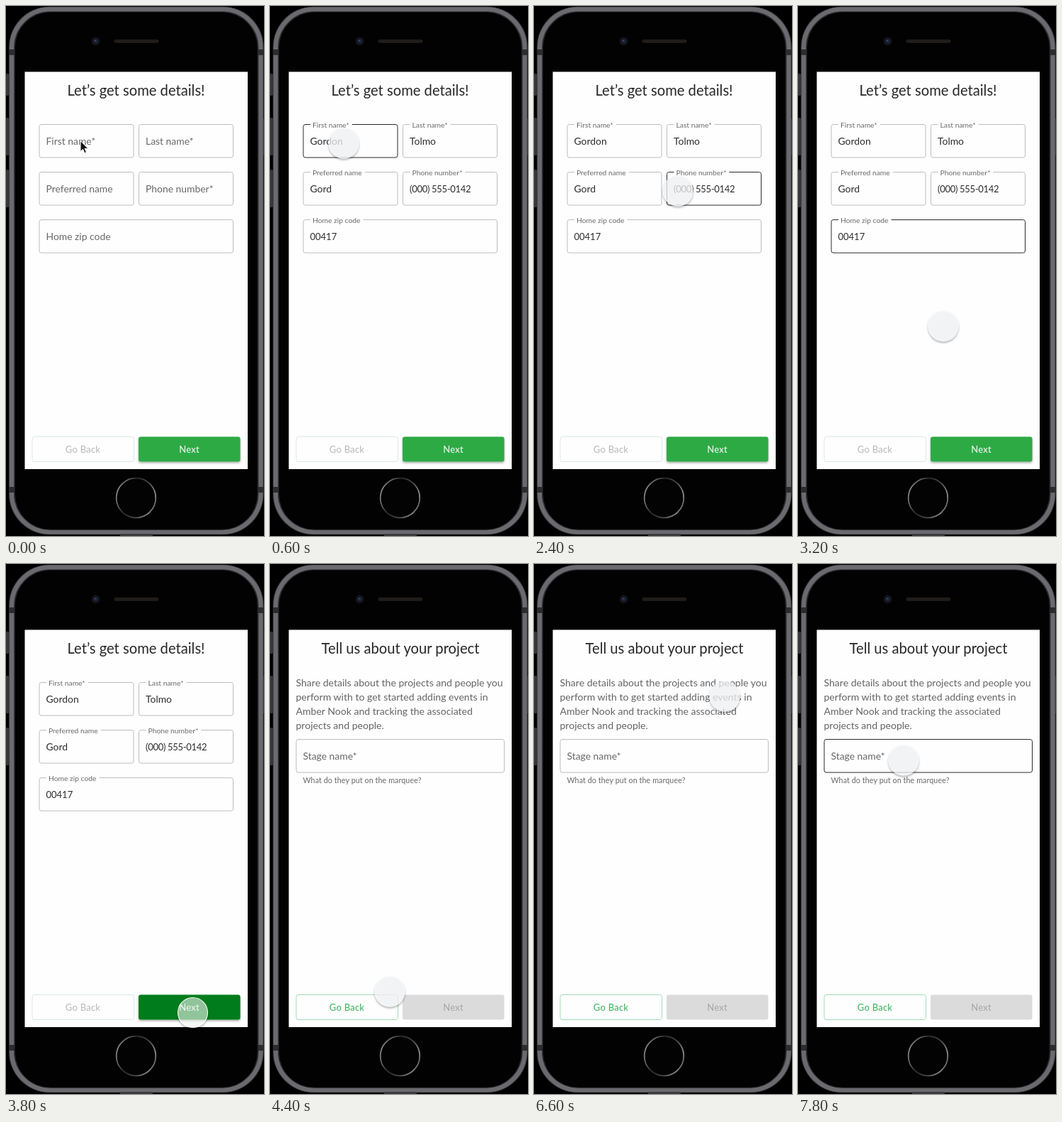
Write an HTML page that moves like this. It is 364 by 745 pixels and loops after 8000 ms.

```html
<!DOCTYPE html>
<html lang="en">
<head>
<meta charset="utf-8">
<title>Sign-up form</title>
<style>
  html, body { margin: 0; width: 100%; height: 100%; overflow: hidden; background: #000; }
  svg { display: block; width: 364px; height: 745px; font-family: Lato, "Open Sans", sans-serif; }
  text { font-size: 13.9px; fill: #67676a; }
  .title { font-size: 20.2px; fill: #262628; text-anchor: middle; }
  .para { font-size: 14.05px; fill: #646467; }
  .float { font-size: 10.3px; fill: #6a6a6c; }
  .help { font-size: 10.7px; letter-spacing: .1px; }
  .value { fill: #2c2c2e; }
  .num { font-size: 13px; }
  .phone { letter-spacing: -.3px; }
  .btn { font-size: 13px; letter-spacing: .25px; text-anchor: middle; }
  .box { fill: none; stroke: #bdbdbf; stroke-width: 1; }
  .focus .box { stroke: #2a2a2c; }
</style>
</head>
<body>
<svg viewBox="0 0 364 745">
  <defs>
    <linearGradient id="ring" x1="0" y1=".3" x2="1" y2=".7">
      <stop offset="0" stop-color="#8e8e90"/>
      <stop offset=".12" stop-color="#6a6a6c"/>
      <stop offset=".35" stop-color="#2a2a2c"/>
      <stop offset=".65" stop-color="#4a4a4c"/>
      <stop offset=".9" stop-color="#8e8e90"/>
      <stop offset="1" stop-color="#58585a"/>
    </linearGradient>
    <filter id="lift" x="-10%" y="-20%" width="120%" height="160%">
      <feDropShadow dx="0" dy="1.8" stdDeviation="1.5" flood-color="#000" flood-opacity=".32"/>
    </filter>
    <!-- shadow only outside the shape, so it does not show through -->
    <filter id="halo" x="-30%" y="-30%" width="160%" height="170%">
      <feGaussianBlur in="SourceAlpha" stdDeviation="1.5"/>
      <feOffset dy="1.8"/>
      <feComposite operator="out" in2="SourceAlpha"/>
    </filter>
  </defs>

  <g id="device">
    <rect width="364" height="745" fill="#000"/>
    <g fill="#37373a">
      <rect x="0" y="95" width="4" height="31" rx="1.5"/>
      <rect x="0" y="157" width="4" height="53" rx="1.5"/>
      <rect x="0" y="230" width="4" height="53" rx="1.5"/>
      <rect x="362" y="158" width="2" height="52"/>
    </g>
    <rect x="4" y="1" width="359.500" height="742" rx="57" fill="#3a3a3d"/>
    <rect x="8" y="4.500" width="351.500" height="735" rx="54" fill="none" stroke="#6a6a6f" stroke-width="6"/>
    <g fill="#2c2c2f">
      <rect x="4" y="61" width="8" height="8"/>
      <rect x="355.500" y="61" width="8" height="8"/>
      <rect x="4" y="676" width="8" height="8"/>
      <rect x="355.500" y="676" width="8" height="8"/>
    </g>
    <rect x="12.500" y="8.500" width="342.500" height="727.500" rx="50" fill="#020203" stroke="#1d1d20"/>
    <rect x="161" y="742" width="46" height="3" rx="1" fill="#3b3b3e"/>
    <circle cx="126.500" cy="49.500" r="6" fill="#14151a"/>
    <circle cx="126.500" cy="49.500" r="2.800" fill="#1d2742"/>
    <circle cx="125.800" cy="48.800" r="1" fill="#3d5186"/>
    <rect x="152.500" y="47" width="63" height="5" rx="2.500" fill="#1f1c1a"/>
    <circle cx="183.500" cy="691.500" r="27.800" fill="#030304" stroke="url(#ring)" stroke-width="1.800"/>
    <rect x="26.500" y="92.500" width="314.500" height="558.500" fill="#fdfefd"/>
  </g>

  <g id="details">
    <text class="title" x="183.500" y="126">Let’s get some details!</text>
  </g>

  <g id="project">
    <text class="title" x="184" y="126">Tell us about your project</text>
    <text class="help" x="46.500" y="307.500">What do they put on the marquee?</text>
  </g>

  <g id="buttons">
    <rect id="backBox" x="37" y="605.500" width="143.500" height="35" rx="3" fill="#fdfefd"/>
    <text id="backText" class="btn" x="108.500" y="627.500">Go Back</text>
    <rect id="nextBox" x="187" y="605.500" width="143.500" height="35" rx="3"/>
    <text id="nextText" class="btn" x="258.500" y="627.500">Next</text>
  </g>

  <path id="arrow" d="M105 189.500v15l3.500-3.200 2.400 5.400 2.500-1.100-2.300-5.200h4.800z"
        fill="#111" stroke="#fff" stroke-width="1"/>
  <g id="touch">
    <circle r="21.500" filter="url(#halo)" opacity=".3"/>
    <circle id="dot" r="21" stroke-width="1.200"/>
  </g>
</svg>

<script>
const LOOP = 8000, STEP = 200;
const FILL = 400, PRESS = 3600, TURN = 4000;
const PAPER = '#fdfefd';
const $ = id => document.getElementById(id);

function paint(el, attrs) {
  for (const key in attrs) el.setAttribute(key, attrs[key]);
}

function add(parent, tag, attrs, text) {
  const el = document.createElementNS('http://www.w3.org/2000/svg', tag);
  paint(el, attrs);
  if (text) el.textContent = text;
  return parent.appendChild(el);
}

const show = (el, on) => el.setAttribute('visibility', on ? 'inherit' : 'hidden');

// focus: [start, end] in ms
function field(page, x, y, w, label, value, focus, kind = '') {
  const g = add($(page), 'g', {});
  add(g, 'rect', { class: 'box', x, y, width: w, height: 46.5, rx: 3 });
  const gap = add(g, 'rect', { x: x + 10, y: y - 2, height: 4, fill: PAPER });
  const small = add(g, 'text', { class: 'float', x: x + 13, y: y + 4 }, label);
  gap.setAttribute('width', small.getComputedTextLength() + 7);
  const large = add(g, 'text', { x: x + 9.5, y: y + 28.5 }, label);
  const entry = add(g, 'text', { class: 'value ' + kind, x: x + 9.5, y: y + 28.5 }, value);
  return t => {
    const active = t >= focus[0] && t < focus[1];
    const filled = value && t >= FILL;
    const raised = value && (filled || active);
    g.setAttribute('class', active ? 'focus' : '');
    show(gap, raised);
    show(small, raised);
    show(large, !raised);
    show(entry, filled);
  };
}

const fields = [
  field('details', 47, 166.5, 133, 'First name*', 'Gordon', [200, 1400]),
  field('details', 187.5, 166.5, 133, 'Last name*', 'Tolmo', [1400, 2000]),
  field('details', 47, 233.5, 133, 'Preferred name', 'Gord', [2000, 2400]),
  field('details', 187.5, 233.5, 133, 'Phone number*', '(000) 555-0142', [2400, 2800], 'num phone'),
  field('details', 47, 300.5, 273.5, 'Home zip code', '00417', [2800, 3400], 'num'),
  field('project', 37, 246.5, 293.5, 'Stage name*', '', [7600, LOOP])
];

[
  'Share details about the projects and people you',
  'perform with to get started adding events in',
  'Amber Nook and tracking the associated',
  'projects and people.'
].forEach((line, i) => add($('project'), 'text', { class: 'para', x: 36.5, y: 171.5 + 20 * i }, line));

// time, x, y
const path = [
  [0, 104, 193], [800, 104, 193], [1400, 236, 194], [2000, 92, 258],
  [2400, 203, 260], [2800, 124, 324], [3200, 205, 450], [3600, 262, 629],
  [3800, 263.5, 630.5], [4000, 263.5, 630.5], [4400, 169, 601],
  [4600, 81, 142], [4800, 81, 142], [5400, 124, 157], [6000, 203, 164],
  [6600, 269, 186], [7000, 240, 222], [7400, 172, 266], [7800, 149, 276], [LOOP, 149, 276]
];

const ease = k => k * k * (3 - 2 * k);

function place(t) {
  const i = path.findIndex(p => p[0] > t);
  const [t0, x0, y0] = path[i - 1], [t1, x1, y1] = path[i];
  const k = ease((t - t0) / (t1 - t0));
  return [x0 + (x1 - x0) * k, y0 + (y1 - y0) * k];
}

function render(t) {
  const second = t >= TURN;
  const pressed = t >= PRESS && !second;
  show($('details'), !second);
  show($('project'), second);
  fields.forEach(update => update(t));

  paint($('backBox'), { stroke: second ? '#a3dcb6' : '#dce8e2' });
  paint($('nextBox'), {
    fill: second ? '#dbdbdc' : pressed ? '#047b1d' : '#2eaa45',
    filter: second ? 'none' : 'url(#lift)'
  });
  $('backText').style.fill = second ? '#35b056' : '#b9b7b8';
  $('nextText').style.fill = second ? '#a5a5a7' : '#fff';

  show($('arrow'), t < 200);
  show($('touch'), t >= 200);
  $('touch').setAttribute('transform', `translate(${place(t)})`);
  paint($('dot'), pressed
    ? { fill: 'rgba(240,245,241,.6)', stroke: 'rgba(255,255,255,.9)' }
    : { fill: 'rgba(240,240,243,.77)', stroke: 'rgba(248,248,250,.8)' });
}

const start = performance.now();
function tick() {
  const t = (performance.now() - start) % LOOP;
  render(Math.floor(t / STEP) * STEP);
  requestAnimationFrame(tick);
}
tick();
</script>
</body>
</html>
```
